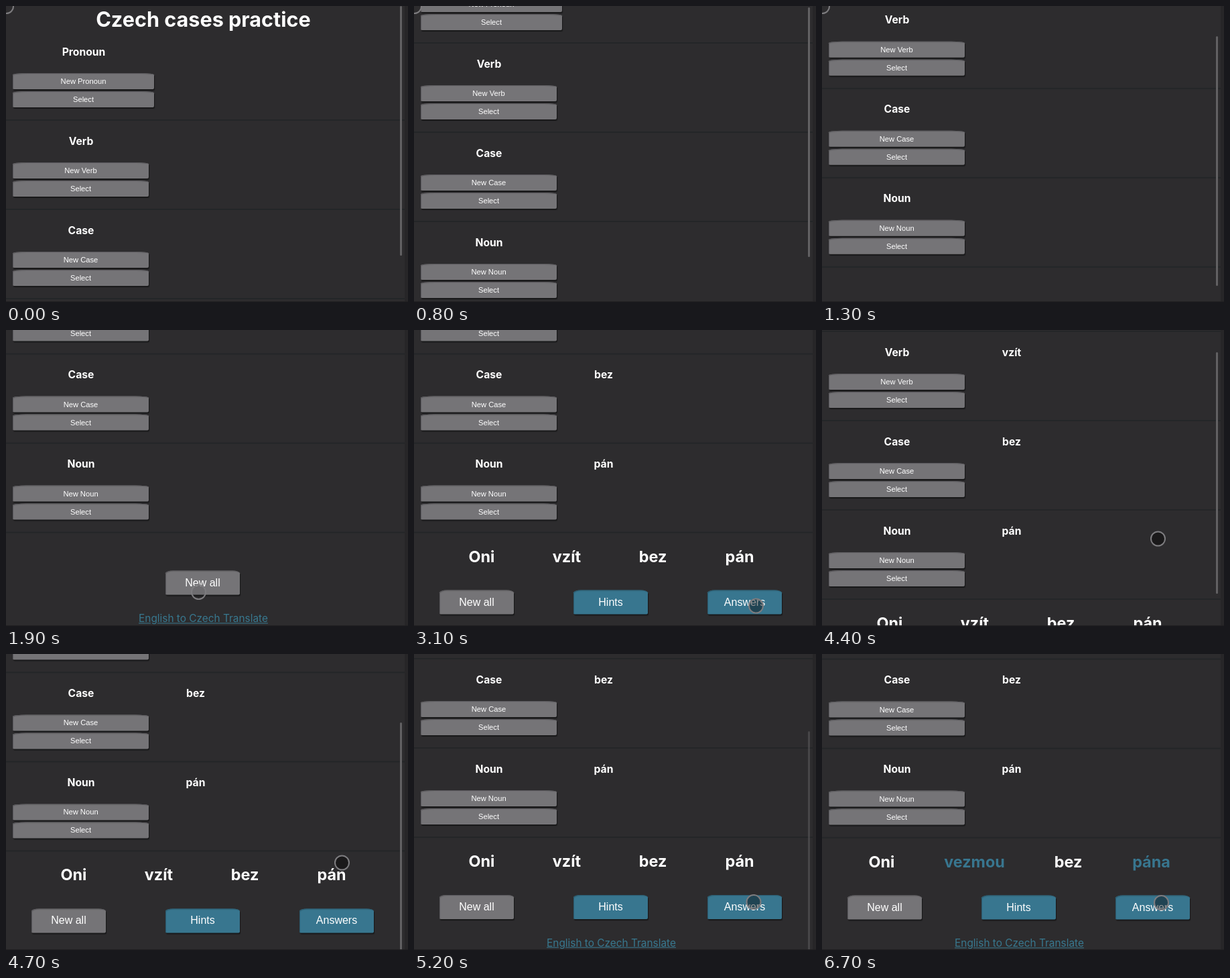
An HTML page for the animation above (6.8 s loop, 600 by 441 pixels).

```html
<!DOCTYPE html>
<html lang="en">
<head>
<meta charset="utf-8">
<title>Czech cases practice</title>
<style>
  html, body { margin: 0; width: 100%; height: 100%; overflow: hidden; background: #2d2c2e; }
  #stage { position: relative; width: 600px; height: 441px; overflow: hidden; background: #2d2c2e; color: #fff; font-family: Inter, "Open Sans", sans-serif; }
  #page { position: absolute; left: 0; top: 0; width: 595px; height: 800px; }
  #page > *, #page .txt { position: absolute; }
  .txt { transform: translate(-50%, -50%); white-space: nowrap; line-height: 1.2; font-weight: 700; }
  .h1 { font-size: 30.6px; }
  .h3 { font-size: 15.7px; }
  .h2 { font-size: 23.4px; }
  .link { font-size: 15.4px; font-weight: 400; color: #38788f; text-decoration: underline; }
  .btn {
    display: flex; align-items: center; justify-content: center; box-sizing: border-box;
    background: #757477; border-radius: 10% 10% 2px 2px;
    box-shadow: 1px 2px 1px #19191a, inset 1px 1px 1px #59585b;
    font: 11.2px "Liberation Sans", Arial, sans-serif;
  }
  .big { width: 111px; height: 36px; font-size: 16px; }
  .blue { background: #38768f; box-shadow: 1px 2px 1px #19191a, inset 1px 1px 1px #2b5a6d; }
  .answer { color: #38768f; }
  .rule { left: 0; width: 595px; height: 2px; background: #242628; }
  #thumb { position: absolute; left: 588px; width: 3px; border-radius: 2px; background: #626163; }
  #edge { position: absolute; right: 0; top: 0; width: 5px; height: 441px; background: #272628; }
  #foot { position: absolute; left: 0; bottom: 0; width: 600px; height: 1px; background: #201f21; }
  #cursor { position: absolute; left: -11.5px; top: -11.5px; width: 23px; height: 23px; box-sizing: border-box; border: 2px solid #7d7c7f; border-radius: 50%; }
</style>
</head>
<body>
<div id="stage">
  <div id="page"></div>
  <div id="edge"></div>
  <div id="thumb"></div>
  <div id="foot"></div>
  <div id="cursor"></div>
</div>
<script>
const LOOP = 6800, STEP = 100;
const REVEAL = 2000, SOLVE = 5300;
const page = document.getElementById('page');
const thumb = document.getElementById('thumb');
const cursor = document.getElementById('cursor');

function add(cls, text, x, y, w, h) {
  const el = document.createElement('div');
  el.className = cls;
  el.textContent = text;
  el.style.left = x + 'px';
  el.style.top = y + 'px';
  if (w) el.style.width = w + 'px';
  if (h) el.style.height = h + 'px';
  page.append(el);
  return el;
}
const show = (els, on) => els.forEach(el => { el.style.display = on ? '' : 'none'; });

add('txt h1', 'Czech cases practice', 294.5, 20);

const values = [];
[['Pronoun', 'Oni'], ['Verb', 'vzít'], ['Case', 'bez'], ['Noun', 'pán']].forEach(([name, value], i) => {
  const y = 133 * i, w = i ? 203 : 211;
  add('txt h3', name, 10.5 + w / 2, y + 69.2);
  values.push(add('txt h3', value, i ? 283 : 291, y + 69.2));
  add('btn', 'New ' + name, 10, y + 100, w, 24);
  add('btn', 'Select', 10, y + 127, w, 24);
  add('rule', '', 0, y + 169);
});

const sentence = (words, xs, blue) => words.map((word, i) =>
  add('txt h2' + (blue.includes(i) ? ' answer' : ''), word, xs[i], 604.6));
const asked = sentence(['Oni', 'vzít', 'bez', 'pán'], [101, 228, 356.5, 486], []);
const solved = sentence(['Oni', 'vezmou', 'bez', 'pána'], [89, 227.5, 367.5, 491.5], [1, 3]);

const newAll = add('btn big', 'New all', 238, 626);
const extra = [
  add('btn big blue', 'Hints', 238, 654.5),
  add('btn big blue', 'Answers', 438, 654.5)
];
const link = add('txt link', 'English to Czech Translate', 294.5, 698.4);

const ease = {
  lin: p => p,
  in: p => p ** 1.4,
  out: p => 1 - (1 - p) ** 2,
  both: p => p * p * (3 - 2 * p)
};

// Keys are [time, value, easing towards that value].
function track(keys, t) {
  let [t0, v0] = keys[0];
  for (const [t1, v1, kind = 'both'] of keys) {
    if (t < t1) return v0 + (v1 - v0) * ease[kind]((t - t0) / (t1 - t0));
    t0 = t1; v0 = v1;
  }
  return v0;
}

const scrollKeys = [
  [300, 0], [800, 115, 'in'], [1100, 170, 'out'], [1200, 170], [1700, 267.4],
  [3200, 267.4], [3900, 30], [4000, 30], [4400, 168, 'in'], [4900, 296, 'out'],
  [5200, 296], [5300, 295.4, 'lin']
];
const cursorX = [
  [1400, 342], [1900, 287], [2500, 287], [3100, 510],
  [3200, 510], [3600, 501], [4700, 501], [5200, 506.5], [5300, 506]
];
const cursorY = [
  [1400, 219], [1900, 390], [2500, 390], [3100, 410.5],
  [3200, 410.5], [3600, 310.5], [4700, 310.5], [5200, 369], [5300, 370]
];
const fillKeys = [[1700, .42], [1900, .06], [2000, .06], [2300, .42]];
const thumbKeys = [
  [300, 0], [500, 1], [1600, 1], [1900, 0],
  [3200, 0], [3400, 1], [5000, 1], [5200, .5], [5400, 0]
];

function draw(t) {
  const y = track(scrollKeys, t);
  const revealed = t >= REVEAL, done = t >= SOLVE;
  page.style.transform = `translateY(${-y}px)`;
  show(values, revealed);
  show(extra, revealed);
  show(asked, revealed && !done);
  show(solved, done);
  newAll.style.left = (revealed ? 38 : 238) + 'px';
  newAll.style.top = (revealed ? 654.5 : 626) + 'px';
  link.style.top = (revealed ? 726.7 : 698.4) + 'px';

  thumb.style.top = -74 + y * (revealed ? .638 : .66) + 'px';
  thumb.style.height = (revealed ? 360 : 372) + 'px';
  thumb.style.opacity = track(thumbKeys, t);

  cursor.style.transform = `translate(${track(cursorX, t)}px, ${track(cursorY, t)}px)`;
  cursor.style.background = `rgba(0, 0, 0, ${track(fillKeys, t)})`;
}

const start = performance.now();
function frame() {
  const t = (performance.now() - start) % LOOP;
  draw(Math.floor(t / STEP) * STEP);
  requestAnimationFrame(frame);
}
frame();
</script>
</body>
</html>
```
